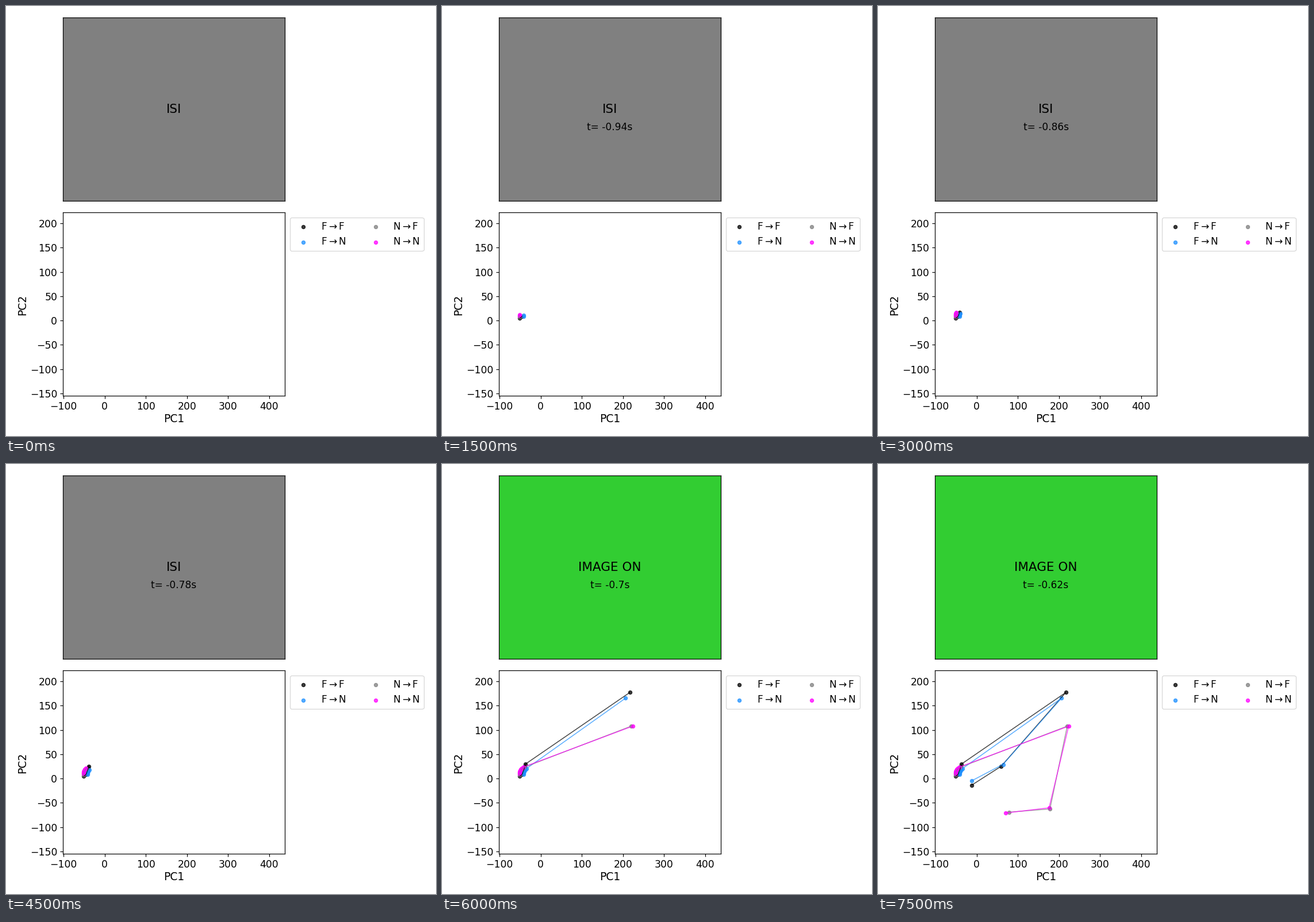
These frames come from a looping animation (748 by 748 pixels, 8000 ms). A matplotlib script:

```python
import matplotlib.pyplot as plt
import numpy as np
from matplotlib.animation import FuncAnimation

SIZE, DPI = 748, 88
INTERVAL, FRAMES, HOLD = 250, 32, 3   # each time step is held for three ticks
IMAGE_STEP = 7                        # steps of slow drift before the image

# label: colour, bend of the drift, drift start and end, then the response
TRACKS = {
    "F$\\rightarrow$F": ("black", 0.5, (-51, 4.3), (-37.1, 29.7),
                         (216.8, 176.9), (59.4, 25), (-11.9, -13.5)),
    "F$\\rightarrow$N": ("dodgerblue", 3, (-41.3, 9), (-35, 20.2),
                         (206.3, 165.1), (64.3, 29.1), (-11.9, -4.6)),
    "N$\\rightarrow$F": ("gray", 3, (-51.7, 7.2), (-39.9, 23.2),
                         (220.3, 107.7), (178.3, -62.6), (79, -69.1)),
    "N$\\rightarrow$N": ("magenta", 3, (-51.7, 10.2), (-41.3, 23.8),
                         (223.8, 107.7), (176.2, -60.2), (70.6, -70.8)),
}


def px(v):
    """Pixels to points."""
    return v * 72 / DPI


def add_axes(left, top, right, bottom):
    box = [left / SIZE, 1 - bottom / SIZE, (right - left) / SIZE, (bottom - top) / SIZE]
    ax = fig.add_axes(box)
    for spine in ax.spines.values():
        spine.set_linewidth(px(1.2))
    return ax


def trajectory(bend, start, end, response):
    """Eased drift from start to end, followed by the response points."""
    u = np.linspace(0, 1, IMAGE_STEP)
    x = start[0] + (end[0] - start[0]) * u ** bend
    y = start[1] + (end[1] - start[1]) * u
    return np.vstack([np.column_stack([x, y]), response])


plt.rcParams["font.family"] = "DejaVu Sans"
fig = plt.figure(figsize=(SIZE / DPI, SIZE / DPI), dpi=DPI, facecolor="white")

screen = add_axes(99.1, 20.1, 485.1, 339.1)
screen.set(xticks=[], yticks=[])
state = screen.text(0.5, 0.5, "", fontsize=px(21.5), ha="center", va="center")
clock = screen.text(0.5, 0.4, "", fontsize=px(17), ha="center", va="center")

plot = add_axes(99.1, 359.4, 485.1, 678.1)
plot.set(xlim=(-101.4, 438.4), ylim=(-154.8, 221.9),
         xticks=range(-100, 401, 100), yticks=range(-150, 201, 50))
plot.tick_params(labelsize=px(17.3), length=px(5), pad=px(5), width=px(1.2))
fig.text(292.2 / SIZE, 1 - 724.5 / SIZE, "PC1", fontsize=px(18.8),
         ha="center", va="baseline")
fig.text(34.2 / SIZE, 1 - 520 / SIZE, "PC2", fontsize=px(18.8), rotation=90,
         rotation_mode="anchor", ha="center", va="baseline")

artists = []
for label, (color, bend, start, end, *response) in TRACKS.items():
    dots = plot.scatter([], [], s=px(6) ** 2, color=color, alpha=0.75,
                        linewidths=px(1.4), label=label)
    line, = plot.plot([], [], color=color, alpha=0.75, lw=px(1.45))
    artists.append((trajectory(bend, start, end, response), dots, line))

plot.legend(loc="upper left", bbox_to_anchor=(1, 1), ncol=2, fontsize=px(17))


def draw(i):
    step = i // HOLD
    shown = step >= IMAGE_STEP
    screen.set_facecolor("limegreen" if shown else "gray")
    state.set_text("IMAGE ON" if shown else "ISI")
    clock.set_text(f"t= {round(-1.02 + 0.04 * step, 2)}s" if step else "")
    for pts, dots, line in artists:
        dots.set_offsets(pts[:step])
        line.set_data(pts[:step, 0], pts[:step, 1])
    return []


anim = FuncAnimation(fig, draw, frames=FRAMES, interval=INTERVAL,
                     repeat=True, repeat_delay=0)
plt.show()
```
